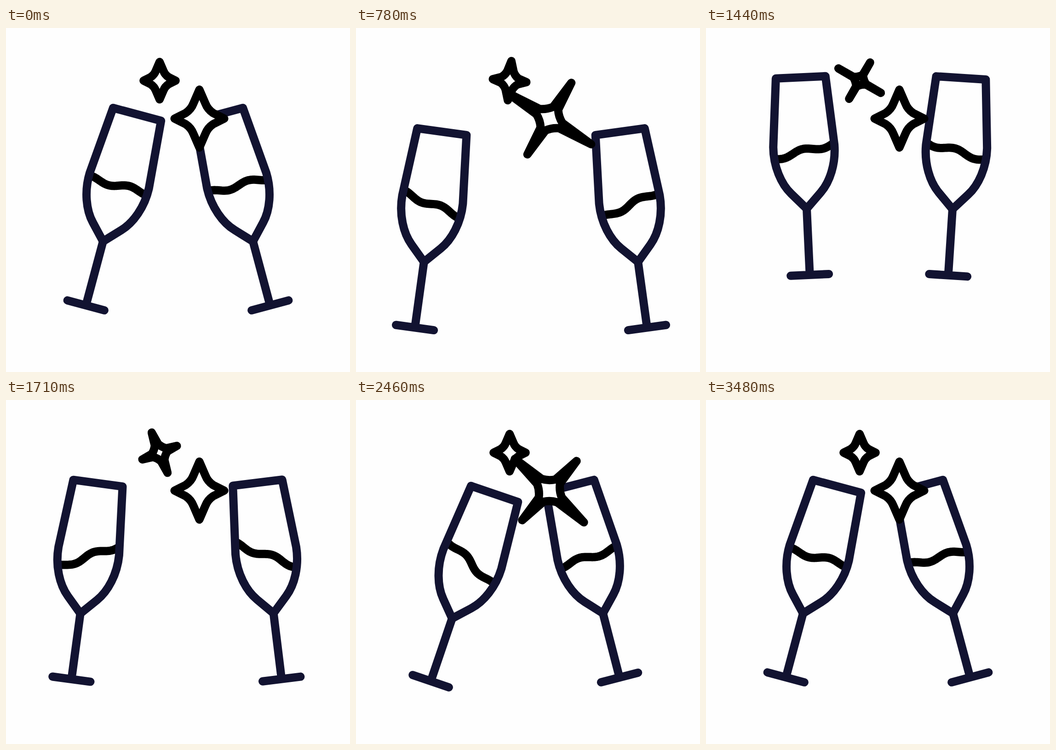
An HTML page for the animation above (4660 ms loop, 748x748 px).

```html
<!DOCTYPE html>
<html lang="en">
<head>
<meta charset="utf-8">
<title>Cheers</title>
<style>
  html, body { margin: 0; width: 100%; height: 100%; overflow: hidden; background: #fefefe; }
  svg { display: block; width: 100%; height: 100%; }
  path { fill: none; stroke-width: 18; stroke-linecap: round; stroke-linejoin: round; }
  .glass { stroke: #121331; }
  .wave { stroke: #000; }
  .star { stroke: #000; fill: #fefefe; }
</style>
</head>
<body>
<svg viewBox="0 0 748 748">
  <defs>
    <path id="bowl" d="M0 0L-32 -34C-53 -56 -68 -95 -66.5 -137L-54 -286H54L66.5 -137C68 -95 53 -56 32 -34Z"/>
    <clipPath id="inside"><use href="#bowl"/></clipPath>
    <g id="glass" class="glass">
      <use href="#bowl"/>
      <path d="M0 0V144M-41.5 144H41.5"/>
    </g>
  </defs>
  <g id="left"><g clip-path="url(#inside)"><path class="wave"/></g><use href="#glass"/></g>
  <g id="right"><g clip-path="url(#inside)"><path class="wave"/></g><use href="#glass"/></g>
  <path id="small" class="star"/>
  <path id="big" class="star"/>
</svg>
<script>
const LOOP = 4660, STEP = 30, END = 3480;
const $ = id => document.getElementById(id);

// Poses: time, x and y of the bowl's tip, tilt
const leftPoses = [
  [0, 211, 464, 15], [450, 143, 510, 7.8], [570, 140, 513, 7], [800, 149, 508, 8],
  [1050, 187, 471, 14], [1125, 193, 442, 19.5], [1440, 219, 393, -2.65], [1740, 160, 470, 8],
  [1980, 191, 494, 4.2], [2460, 209, 475, 18.8], [2700, 212, 465, 14.5], [END, 211, 464, 15]
];
const rightPoses = [
  [0, 537, 464, -15], [450, 618, 509, -7.8], [570, 621, 513, -7], [800, 612, 508, -8],
  [1050, 570, 471, -14], [1125, 555, 442, -19.5], [1440, 536, 394, 3.7], [1740, 583, 470, -8],
  [1980, 550, 501, -13.3], [2460, 537, 464, -14.5], [2900, 537, 464, -15]
];
// Liquid: time, left slope, right slope, drift of the ripple
const liquid = [
  [0, 0, 0, 0], [450, 8, -13, 43], [1050, 18, -20, 116], [1440, -11.5, 13, 149],
  [1980, -36, 33, 181], [2460, 27, -3.5, 220], [END, 0, 0, 352]
];
// Stars: time, turn, spike length
const bigKeys = [
  [0, 0, 1], [450, 40, 1.52], [640, 88, 1.8], [1050, 170, 1.26], [1290, 180, 1], [1700, 180, 1],
  [1980, 194, 1.28], [2240, 258, 1.75], [2460, 312.6, 1.62], [2700, 340, 1.68],
  [3270, 357, 1.3], [END, 360, 1]
];
const smallKeys = [
  [0, 0, 1], [560, 0, 1], [1050, 22, 1.17], [1440, 120, 1.31], [1980, 178.6, 1], [2160, 180, 1]
];

// Smooth curve through the keys that never overshoots them
function sample(keys, t) {
  const last = keys.length - 1;
  if (t >= keys[last][0]) return keys[last].slice(1);
  let i = 0;
  while (t >= keys[i + 1][0]) i++;
  const [a, b] = [keys[i], keys[i + 1]];
  const span = b[0] - a[0], u = (t - a[0]) / span;
  const slope = (j, c) => (keys[j + 1][c] - keys[j][c]) / (keys[j + 1][0] - keys[j][0]);
  const tangent = (j, c) => {
    if (j === 0 || j === last) return 0;
    const p = slope(j - 1, c), q = slope(j, c);
    return p * q <= 0 ? 0 : 2 * p * q / (p + q);
  };
  return a.slice(1).map((v, n) => {
    const c = n + 1, w = b[c];
    return v + (w - v) * u * u * (3 - 2 * u)
      + span * u * (1 - u) * ((1 - u) * tangent(i, c) - u * tangent(i + 1, c));
  });
}

function ripple(drift) {
  let d = "";
  for (let x = -108; x <= 108; x += 3)
    d += `${d ? "L" : "M"}${x} ${(-5 * Math.sin(Math.PI * (x - drift) / 44)).toFixed(2)}`;
  return d;
}

// Four spikes; longer spikes pull the waist inward
function starPath(size, spike, pinch) {
  const waist = 1 - pinch * (spike - 1);
  const side = Math.max(0.05, 1 - Math.max(0.7, 2 * pinch) * (spike - 1));
  const reach = (1 + waist) / 2;
  const pt = (x, y) => `${(x * size).toFixed(2)} ${(y * size).toFixed(2)}`;
  const tall = 63 * spike, wide = 54 * spike;
  let d = "M" + pt(0, -tall);
  for (const [sx, sy, fromTip] of [[1, -1, true], [1, 1, false], [-1, 1, true], [-1, -1, false]]) {
    const nearTall = pt(sx * 13 * side, sy * 33 * reach);
    const nearWide = pt(sx * 30 * reach, sy * 12 * side);
    const mid = pt(sx * 18 * waist, sy * 20 * waist);
    d += fromTip
      ? `L${nearTall}Q${mid} ${nearWide}L${pt(sx * wide, 0)}`
      : `L${nearWide}Q${mid} ${nearTall}L${pt(0, sy * tall)}`;
  }
  return d + "Z";
}

function drawGlass(id, poses, t, slope, drift) {
  const [x, y, tilt] = sample(poses, t);
  const glass = $(id), wave = glass.querySelector(".wave");
  glass.setAttribute("transform", `translate(${x} ${y}) rotate(${tilt})`);
  wave.setAttribute("transform", `translate(2 -126) rotate(${slope})`);
  wave.setAttribute("d", ripple(drift));
}

function drawStar(id, keys, t, x, y, size, pinch) {
  const [turn, spike] = sample(keys, t);
  $(id).setAttribute("transform", `translate(${x} ${y}) rotate(${turn})`);
  $(id).setAttribute("d", starPath(size, spike, pinch));
}

function draw(t) {
  const [leftSlope, rightSlope, drift] = sample(liquid, t);
  drawGlass("left", leftPoses, t, leftSlope, drift);
  drawGlass("right", rightPoses, t, rightSlope, drift);
  drawStar("small", smallKeys, t, 334, 114.5, 0.645, 1.7);
  drawStar("big", bigKeys, t, 420.5, 197, 1, 0.35);
}

const start = performance.now();
function tick(now) {
  const t = Math.max(0, now - start) % LOOP;
  draw(Math.min(END, Math.floor(t / STEP) * STEP));
  requestAnimationFrame(tick);
}
draw(0);
requestAnimationFrame(tick);
</script>
</body>
</html>
```
